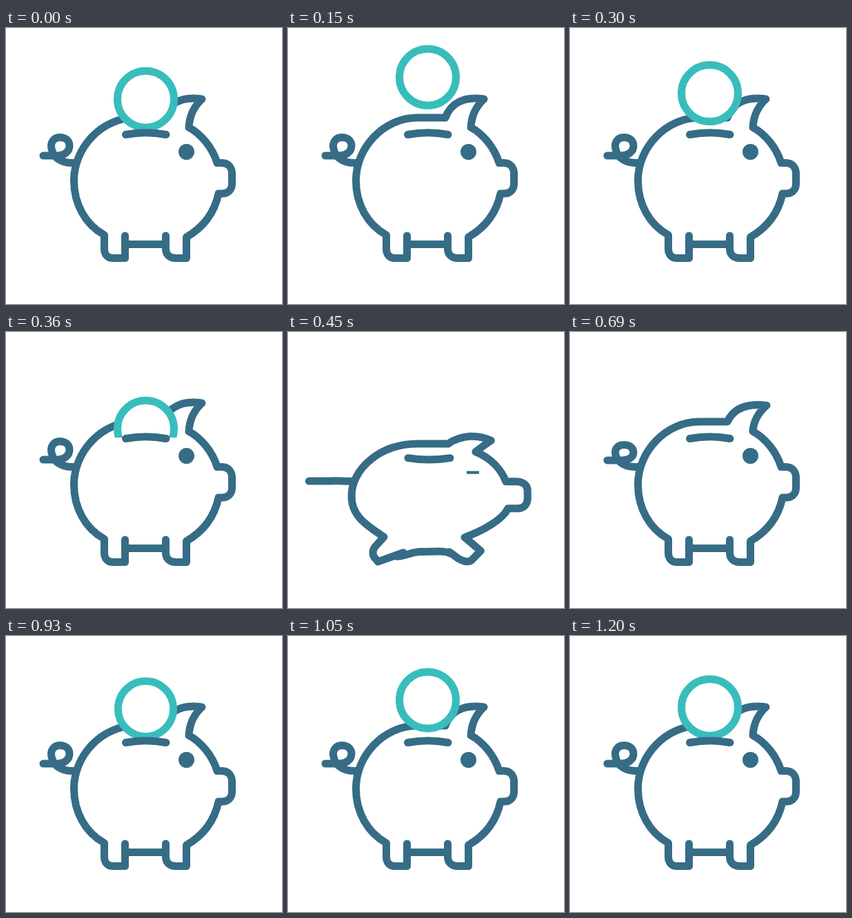
These frames come from a looping animation (400x400 px, 3260 ms). An HTML page:

```html
<!DOCTYPE html>
<html lang="en">
<head>
<meta charset="utf-8">
<title>Piggy bank</title>
<style>
html, body { margin: 0; width: 100%; height: 100%; overflow: hidden; background: #fff; }
svg { display: block; width: 100vw; height: 100vh; }
.pig path { fill: none; stroke: #366c86; stroke-width: 11; stroke-linecap: round; stroke-linejoin: round; }
.eye { fill: #366c86; }
.coin { fill: #fff; stroke: #38bdbd; stroke-width: 11; transform-origin: 0 0; }

.body, .belly, .slot, .tail, .eye, .gate { animation: 3260ms linear infinite; }
.body { animation-name: body; }
.belly { animation-name: belly; }
.slot { animation-name: slot; }
.tail { animation-name: tail; }
.eye { animation-name: eye; }
.gate { animation-name: gate; }
.coin { animation: hop 3260ms linear infinite, grow 3260ms linear infinite; }

/* squash 360-450 ms, rebound to 510 ms, settle to 750 ms */
@keyframes body {
  0%, 11.043%, 23.006%, 100% {
    d: path("M172.5 301 L172.5 333.5 L155 333.5 C147 333.5 142.5 328 142.5 320 L142.5 300 C115 285 98.5 255 98.5 221 C98.5 172.5 139.5 130 187 130 L228 130 C236 108.5 255 99 284 103 C273 113 266 127 265 144 C283 154 299 173 306 195.5 L313 195.5 C322 195.5 327.5 202 327.5 211 L327.5 226 C327.5 234 322 240 313 240 L308 240 C302 268 286 289 261.5 303 L261.5 333.5 L246 333.5 C237 333.5 231.5 328 231.5 320 L231.5 301");
    animation-timing-function: ease-in;
  }
  13.804% {
    d: path("M167 320 L130 333 L127 329 C121 324 122 316 126 311 L139 297 C108 277 92 264 92 238 C92 198 134 162.5 188 162.5 L232 162.5 C252 149 276 149 294.5 158 C287 163 280 168 272 174 C294 183 309 199 316 217 L331 217 C341 217 347.5 222 347.5 230 L347.5 241 C347.5 250 342 256 333 256 L319 256 C311 272 283 288 256 297.5 L279.5 317 L266 331 C258 336 247 329 241 324 L234 319");
  }
  15.644% {
    d: path("M171 306 L162 330 L150 330 C143 330 138.5 326 140 318 L142.5 299 C112 280 99.5 258 99.5 228 C99.5 180 136.5 138.5 185 138.5 L228 138.5 C240 124 259 115 279 114 C273 125 268 137 264.5 151 C281 160 296 179 303.5 200 L314 200 C323 200 328.5 206 328.5 215 L328.5 230 C328.5 239 323 245 314 245 L306 245 C300 268 283 288 259 301.5 L265.5 328 L251 331 C243 332 239 328 237 321 L232.5 307");
    animation-timing-function: ease-out;
  }
  21.166% {
    d: path("M172.5 301 L172.5 333.5 L155 333.5 C147 333.5 142.5 328 142.5 320 L142.5 300 C115 285 98.5 255 98.5 221 C98.5 172.5 139.5 130 187 130 L228 130 C237 111 256 103 285 106.5 C274 116 266 128 265 144 C283 154 299 173 306 195.5 L313 195.5 C322 195.5 327.5 202 327.5 211 L327.5 226 C327.5 234 322 240 313 240 L308 240 C302 268 286 289 261.5 303 L261.5 333.5 L246 333.5 C237 333.5 231.5 328 231.5 320 L231.5 301");
  }
}
@keyframes belly {
  0%, 11.043%, 21.166%, 100% {
    d: path("M172.5 313.5 C180 313.5 185 313.5 192 313.5 L212 313.5 C218 313.5 225 313.5 231.5 313.5");
    animation-timing-function: ease-in;
  }
  13.804% { d: path("M157 325.5 C172 325 178 318.5 192 318.5 L220 318 C230 318 234 320 238 322"); }
  15.644% {
    d: path("M168 315.5 C176 316 184 315.5 192 315 L212 314 C220 313.5 228 314 236 316");
    animation-timing-function: ease-out;
  }
}
@keyframes slot {
  0%, 11.043%, 21.166%, 100% { d: path("M173.5 154.5 Q203 149 232 154.5"); animation-timing-function: ease-in; }
  13.804% { d: path("M174 183 Q204 188 235 183"); }
  15.644% { d: path("M174 161.5 Q203 160 231 161.5"); animation-timing-function: ease-out; }
}
@keyframes tail {
  0%, 11.043%, 23.006%, 100% {
    d: path("M54 185 L71 185 C84 186 92.5 179 92 170 C91.5 162 85 158.5 78 158.5 C69 158.5 64 166 66 175 C69 189 81 196.5 100 195.5");
    animation-timing-function: ease-in;
  }
  13.804% { d: path("M30 216.5 L42 216.5 C47 216.5 52 216.5 57 216.5 C61 216.5 65 216.5 69 216.5 C73 216.5 77 216.5 80 216.5 C84 216.5 88 216.5 93 216.5"); }
  15.644% {
    d: path("M51.5 193 L71 193 C84 193 92.5 189 92 183 C91.5 177 86 174 79 174 C70 174 66 179 67.5 186 C70 196 82 201 101 200.5");
    animation-timing-function: ease-out;
  }
  21.166% { d: path("M54 186 L71 186 C84 187 92.5 182 92 174 C91.5 167 85 163.5 78 163.5 C69 163.5 64 170 66 178 C69 190 81 196.5 100 195.5"); }
}
@keyframes eye {
  0%, 11.043%, 21.166%, 100% {
    x: 250px; y: 168px; width: 23px; height: 23px; rx: 11.5px; ry: 11.5px;
    animation-timing-function: ease-in;
  }
  13.804% { x: 259px; y: 202px; width: 18px; height: 4px; rx: 0px; ry: 0px; }
  15.644% {
    x: 250px; y: 178.5px; width: 21.5px; height: 15.5px; rx: 10.5px; ry: 7.75px;
    animation-timing-function: ease-out;
  }
}
@keyframes gate {
  0%, 11.043%, 21.166%, 100% { transform: translateY(0px); animation-timing-function: ease-in; }
  13.804% { transform: translateY(30px); }
  15.644% { transform: translateY(8px); animation-timing-function: ease-out; }
}

/* toss, fall into the slot, then pop back out */
@keyframes hop {
  0% { translate: 202.5px 103.5px; animation-timing-function: cubic-bezier(.33, .67, .67, 1); }
  6.442% { translate: 202.5px 68.5px; animation-timing-function: cubic-bezier(.333, 0, .667, .333); }
  13.804% { translate: 202.5px 250px; animation-timing-function: step-end; }
  25.767% { translate: 202.5px 150px; }
  28.528% { translate: 202.5px 106px; animation-timing-function: cubic-bezier(.33, .67, .67, 1); }
  30.828% { translate: 202.5px 86.5px; animation-timing-function: ease; }
  36.81%, 100% { translate: 202.5px 103.5px; }
}
@keyframes grow {
  0%, 13.7% { scale: 1; }
  13.701%, 25.767% { scale: 0; }
  28.62%, 100% { scale: 1; }
}
</style>
</head>
<body>
<svg viewBox="0 0 400 400">
  <clipPath id="above"><rect class="gate" x="0" y="-100" width="400" height="253"/></clipPath>
  <g class="pig">
    <path class="tail"/>
    <path class="body"/>
    <path class="belly"/>
    <rect class="eye"/>
  </g>
  <g clip-path="url(#above)"><circle class="coin" r="41"/></g>
  <g class="pig"><path class="slot"/></g>
</svg>
</body>
</html>
```
